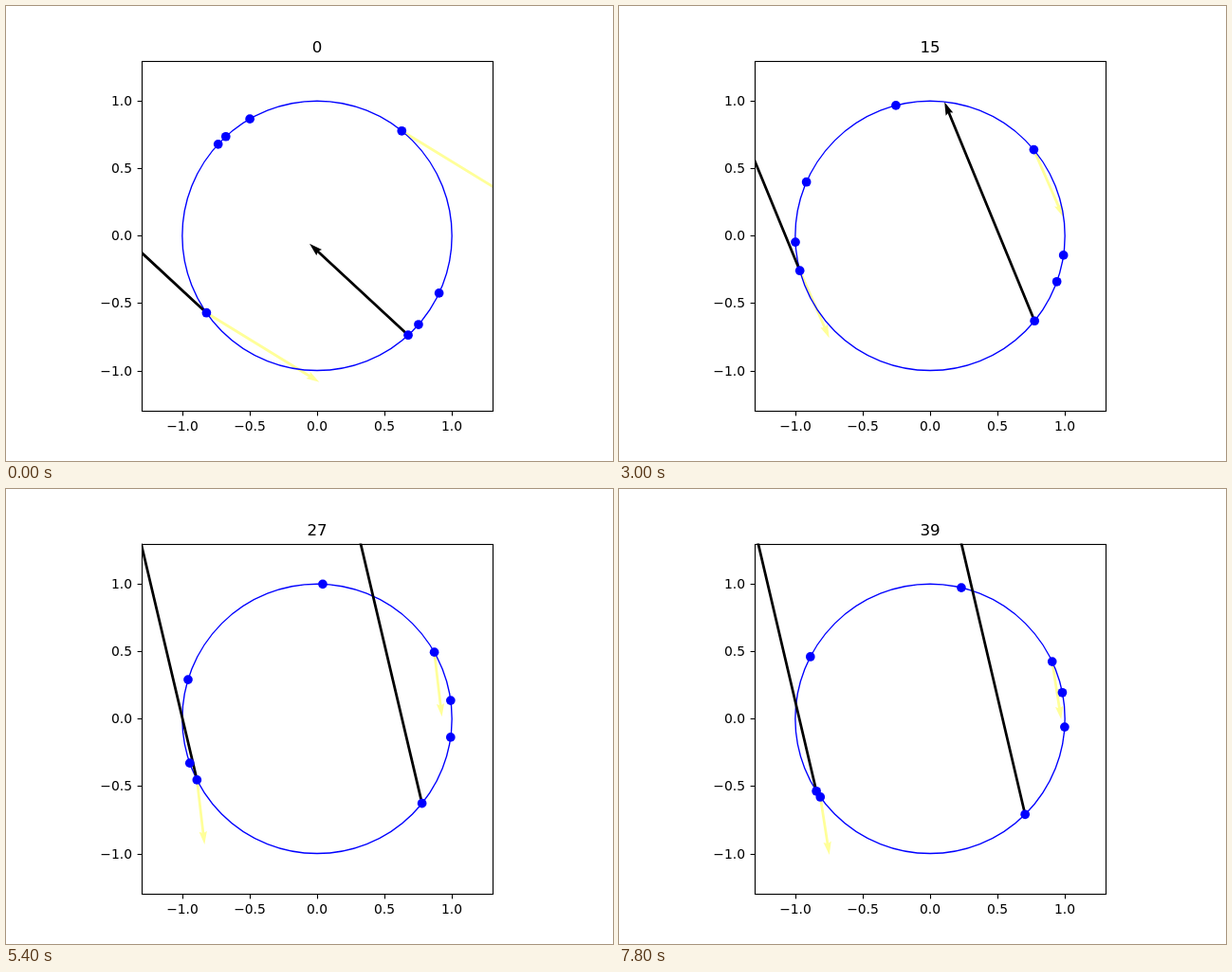
Recreate the animation shown at these times as an HTML page with a canvas. Size 640 by 480 pixels, loop 8 s.

```html
<!DOCTYPE html>
<html lang="en">
<head>
<meta charset="utf-8">
<title>Points on a circle</title>
<style>
  html, body { margin: 0; width: 100%; height: 100%; overflow: hidden; background: #fff; }
  canvas { display: block; }
</style>
</head>
<body>
<canvas id="stage" width="640" height="480"></canvas>
<script>
const ctx = document.getElementById('stage').getContext('2d');

const CX = 328, CY = 242.4, UNIT = 369.6 / 2.6;
const BOX = { x: 143.2, y: 57.6, size: 369.6 };
const STEP_MS = 200, STEPS = 40;
const SHAFT = 2.77;
const FONT = '"DejaVu Sans", sans-serif';

// step, angles of the eight points in degrees, black vector, yellow vector
const poses = [
  { at: 0,  deg: [119.9, 132.6, 137.2, 214.9, 51.1, -25.2, -41.2, -47.5], black: [-104, -96.5], yellow: [119, 73] },
  { at: 9,  deg: [112.4, 149.0, 159.6, 193.3, 43.7, -16.2, -23.5, -42.3], black: [-127, -197],  yellow: [63.5, 76.5] },
  { at: 15, deg: [104.7, 156.5, 182.7, 195.0, 39.7, -8.3, -19.9, -39.2],  black: [-95, -231],   yellow: [31, 71] },
  { at: 20, deg: [94.0, 164.3, 187.9, 206.1, 41.1, -0.6, -20.5, -38.6],   black: [-78, -271],   yellow: [20, 75] },
  { at: 27, deg: [87.6, 163.1, 199.2, 207.0, 29.6, 7.8, -7.9, -38.9],     black: [-72, -305],   yellow: [8, 68] },
  { at: 32, deg: [85.2, 157.1, 205.7, 207.9, 28.3, 13.6, -9.2, -45.5],    black: [-79, -312],   yellow: [10, 72] },
  { at: 39, deg: [76.6, 152.6, 212.5, 215.5, 25.1, 11.2, -3.5, -45.2],    black: [-74, -315],   yellow: [9.5, 61] }
];

const mix = (a, b, k) => a.map((v, i) => v + (b[i] - v) * k);

function poseAt(step) {
  let i = 0;
  while (i < poses.length - 2 && poses[i + 1].at <= step) i++;
  const a = poses[i], b = poses[i + 1];
  const k = (step - a.at) / (b.at - a.at);
  return {
    deg: mix(a.deg, b.deg, k),
    black: mix(a.black, b.black, k),
    yellow: mix(a.yellow, b.yellow, k)
  };
}

function onCircle(deg) {
  const r = deg * Math.PI / 180;
  return [CX + UNIT * Math.cos(r), CY - UNIT * Math.sin(r)];
}

function disc([x, y], r) {
  ctx.beginPath();
  ctx.arc(x, y, r, 0, 2 * Math.PI);
}

function arrow([x, y], [dx, dy], color) {
  const len = Math.hypot(dx, dy), h = SHAFT / 2;
  const neck = len - 4.5 * SHAFT, barb = len - 5 * SHAFT;
  ctx.save();
  ctx.translate(x, y);
  ctx.rotate(Math.atan2(dy, dx));
  ctx.beginPath();
  ctx.moveTo(0, -h);
  ctx.lineTo(neck, -h);
  ctx.lineTo(barb, -3 * h);
  ctx.lineTo(len, 0);
  ctx.lineTo(barb, 3 * h);
  ctx.lineTo(neck, h);
  ctx.lineTo(0, h);
  ctx.fillStyle = color;
  ctx.fill();
  ctx.restore();
}

function line(x1, y1, x2, y2) {
  ctx.beginPath();
  ctx.moveTo(x1, y1);
  ctx.lineTo(x2, y2);
  ctx.stroke();
}

function drawAxes() {
  ctx.strokeStyle = ctx.fillStyle = '#000';
  ctx.lineWidth = 1.11;
  ctx.strokeRect(143.5, 58.5, 370, 369);
  ctx.font = `13.89px ${FONT}`;
  for (let v = -1; v <= 1; v += 0.5) {
    const label = v.toFixed(1).replace('-', '\u2212');
    const x = Math.round(CX + v * UNIT), y = Math.round(CY - v * UNIT);
    line(x + 0.5, 427.5, x + 0.5, 432.4);
    line(138.6, y + 0.5, 143.5, y + 0.5);
    ctx.textAlign = 'center';
    ctx.fillText(label, x, 448);
    ctx.textAlign = 'right';
    ctx.fillText(label, 133, y + 5);
  }
}

function draw(step) {
  const { deg, black, yellow } = poseAt(step);
  const dots = deg.map(onCircle);
  const leftBlack = dots[step < 28 ? 3 : 2];

  ctx.fillStyle = '#fff';
  ctx.fillRect(0, 0, 640, 480);

  ctx.save();
  ctx.beginPath();
  ctx.rect(BOX.x, BOX.y, BOX.size, BOX.size);
  ctx.clip();
  for (const p of [dots[3], dots[4]]) arrow(p, yellow, '#ffff99');
  disc([CX, CY], UNIT);
  ctx.strokeStyle = '#00f';
  ctx.lineWidth = 1.39;
  ctx.stroke();
  for (const p of [leftBlack, dots[7]]) arrow(p, black, '#000');
  ctx.fillStyle = '#00f';
  for (const p of dots) {
    disc(p, 4.86);
    ctx.fill();
  }
  ctx.restore();

  drawAxes();
  ctx.font = `16.67px ${FONT}`;
  ctx.textAlign = 'center';
  ctx.fillText(String(step), 328, 49);
}

function tick() {
  draw(Math.floor(performance.now() / STEP_MS) % STEPS);
  requestAnimationFrame(tick);
}
tick();
</script>
</body>
</html>
```
